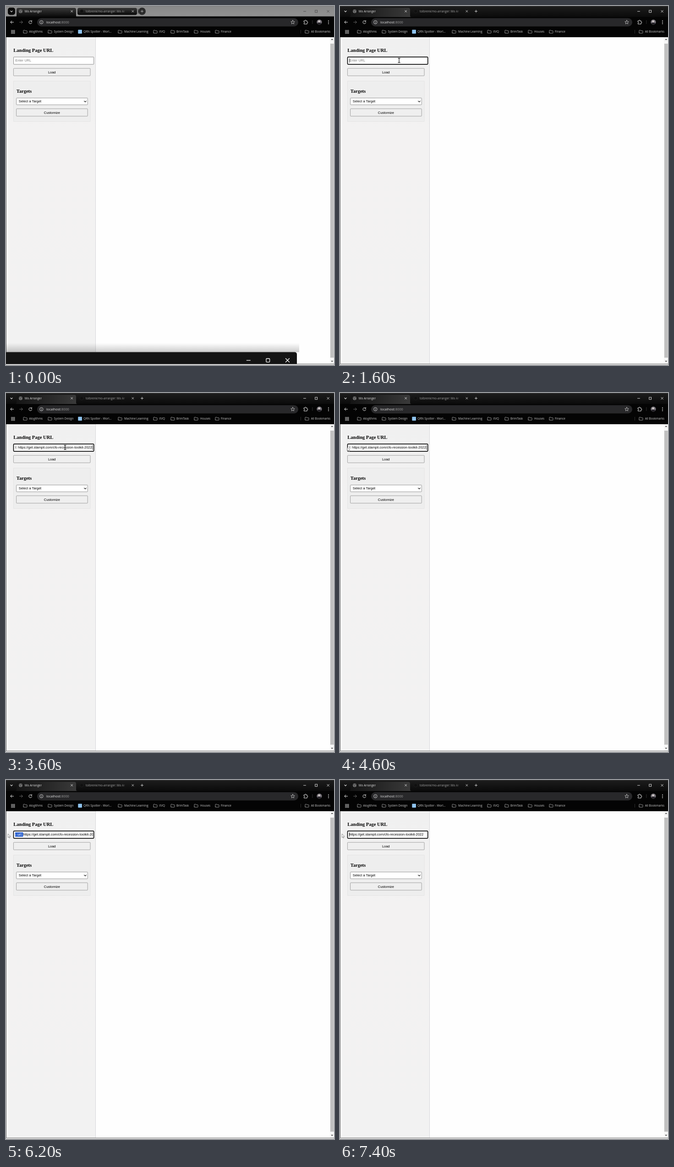
These frames come from a looping animation (716x782 px, 8 s). An HTML page:

```html
<!DOCTYPE html>
<html lang="en">
<head>
<meta charset="utf-8">
<title>Landing page form</title>
<style>
html, body { margin: 0; width: 100%; height: 100%; overflow: hidden; background: #fff; }
svg { display: block; width: 716px; height: 782px; }
text { white-space: pre; }
.ui { font: 6.35px "Open Sans", "Noto Sans", sans-serif; fill: #c9c9c9; }
.form { font: 7.45px "Liberation Sans", Arial, sans-serif; fill: #000; }
.head { font: bold 10.5px "Liberation Serif", "Times New Roman", serif; fill: #000; }
.line { fill: none; stroke-linecap: round; stroke-linejoin: round; }
</style>
</head>
<body>
<svg id="stage" viewBox="0 0 716 782" xmlns="http://www.w3.org/2000/svg">
<defs>
  <linearGradient id="barOn" x2="0" y2="1"><stop stop-color="#1d1d1d"/><stop offset="1" stop-color="#0b0b0b"/></linearGradient>
  <linearGradient id="barOff" x2="0" y2="1"><stop stop-color="#888"/><stop offset="1" stop-color="#929292"/></linearGradient>
  <linearGradient id="tabOn"><stop stop-color="#141414"/><stop offset="1" stop-color="#3a3a3a"/></linearGradient>
  <linearGradient id="tabOff" x2="0" y2="1"><stop stop-color="#383838"/><stop offset="1" stop-color="#080808"/></linearGradient>
  <linearGradient id="fade" gradientUnits="userSpaceOnUse" x1="250" x2="269"><stop stop-color="#a0a0a0"/><stop offset="1" stop-color="#a0a0a0" stop-opacity="0"/></linearGradient>
  <linearGradient id="side" x2="0" y2="1"><stop stop-color="#f0f0f0"/><stop offset=".3" stop-color="#f3f2f2"/><stop offset="1" stop-color="#f2f2f2"/></linearGradient>
  <linearGradient id="shade" x2="0" y2="1"><stop stop-color="#000" stop-opacity="0"/><stop offset="1" stop-color="#000" stop-opacity=".2"/></linearGradient>
  <clipPath id="field"><rect x="20" y="112" width="170" height="15"/></clipPath>
  <clipPath id="face"><circle cx="684" cy="35" r="5.6"/></clipPath>
</defs>
<g id="page"></g>
<g id="input"></g>
<g id="chrome"></g>
<g id="strip"></g>
<g id="overlap"></g>
<g id="pointer"></g>
</svg>
<script>
const $ = id => document.getElementById(id);
const LOOP = 8000, STEP = 200;
const PREFIX = "- url: ";
const URL_TEXT = "https://get.stampli.com/cfo-recession-toolkit-2022";
const APP = "Mo Arranger";

const rect = (x, y, w, h, fill, more = "") =>
  `<rect x="${x}" y="${y}" width="${w}" height="${h}" fill="${fill}" ${more}/>`;
const label = (x, y, str, cls, more = "") =>
  `<text x="${x}" y="${y}" class="${cls}" ${more}>${str}</text>`;
const path = (d, color, w = 1, more = "") =>
  `<path class="line" d="${d}" stroke="${color}" stroke-width="${w}" ${more}/>`;
const circle = (x, y, r, fill, more = "") =>
  `<circle cx="${x}" cy="${y}" r="${r}" fill="${fill}" ${more}/>`;
const cross = (x, y, r, color, w) =>
  path(`M${x - r} ${y - r}l${2 * r} ${2 * r}m0 ${-2 * r}l${-2 * r} ${2 * r}`, color, w);
const folder = x =>
  path(`M${x - 4} 58.3v-4.6q0-.9.9-.9h2l1.2 1.1h3q.9 0 .9.9v3.5q0 .9-.9.9h-6.2q-.9 0-.9-.9z`, "#b5b5b5", .8);
const button = (x, y, w, str) =>
  rect(x, y, w, 16.2, "#efefef", 'stroke="#8c8c8c" stroke-width=".8" rx="1"') +
  label(x + w / 2, y + 10.8, str, "form", 'text-anchor="middle"');

function drawPage() {
  return rect(0, 0, 716, 782, "#fefefe") +
    rect(1, 68, 4.5, 711, "#f9f9f9") +
    rect(5, 68, 190.5, 711, "url(#side)") +
    rect(195, 68, .9, 711, "#d3d3d6") +
    label(16.3, 100, "Landing Page URL", "head") +
    button(16.4, 135.8, 167.6, "Load") +
    rect(16.4, 163.6, 167.6, 87.8, "#eeeeee", 'stroke="#e2e2e2" stroke-width=".8"') +
    label(22.7, 189, "Targets", "head") +
    rect(22.6, 200.4, 155.6, 14.8, "#fff", 'stroke="#808080" stroke-width=".8" rx="1"') +
    label(27.7, 210.4, "Select a Target", "form") +
    path("M170.7 206.9l2.2 2.2 2.2-2.2", "#111", 1.1) +
    button(22.6, 223.8, 155.6, "Customize") +
    rect(707, 68, 9, 711, "#f6f6f6") +
    rect(708, 82, 7.6, 684, "#c0c0c0") +
    `<path d="M709.4 74l2.4-3 2.4 3zM709.4 772.8l2.4 3 2.4-3z" fill="#555"/>` +
    rect(0, 68, 1, 712, "#666") +
    rect(0, 779, 716, 1.4, "#858585") +
    rect(0, 780.4, 716, 1.6, "#dedede");
}

function drawChrome() {
  const marks = [["Alogithms", 42, 50.5], ["System Design", 96, 104.5], ["Machine Learning", 249, 258],
    ["XVQ", 326, 334.5], ["BrimTask", 364, 372], ["Houses", 415, 424], ["Finance", 461, 469], ["All Bookmarks", 657, 665.7]];
  let s = rect(0, 24, 716, 44, "#040404") +
    rect(68, 26.5, 570, 18, "#28282a", 'rx="9"') +
    path("M16.5 35.3h-6.6m3-3l-3 3 3 3", "#e4e4e4") +
    path("M29.7 35.3h6.6m-3-3l3 3-3 3", "#656565") +
    path("M56 33.4a3.3 3.3 0 1 0 .5 2.7M56.3 31.7v2h-2", "#e4e4e4") +
    circle(77.3, 35.3, 3.7, "none", 'stroke="#d8d8d8" stroke-width=".9"') +
    path("M77.3 35.1v2M77.3 33.4v.1", "#d8d8d8", .9) +
    `<text x="88" y="38" class="ui" style="font-size:7.4px;fill:#e8e8e8">localhost<tspan fill="#9b9b9b">:8000</tspan></text>` +
    path("M626 31l1.2 2.8 3 .3-2.3 2 .7 3-2.6-1.6-2.6 1.6.7-3-2.3-2 3-.3z", "#cfcfcf", .8) +
    path("M650.5 32.4h2.2q-.3-1.7 1.1-1.7t1.1 1.7h2.3v2.3q1.7-.2 1.7 1.1t-1.7 1.1v2.4h-6.7v-2.2q1.6 0 1.6-1.2t-1.6-1.2z", "#e0e0e0") +
    rect(668.5, 31, .8, 8, "#3c3c3c") +
    circle(684, 35, 5.6, "#77737a") +
    `<g clip-path="url(#face)">${circle(683.6, 33.6, 2.3, "#d0c9c8")}${rect(679.5, 36.3, 8.5, 6, "#242228", 'rx="3"')}</g>`;
  for (const y of [31.9, 35.2, 38.5]) s += circle(704, y, .95, "#e0e0e0");
  for (const x of [11.8, 16.2]) for (const y of [52.9, 57.2])
    s += rect(x, y, 2.7, 2.7, "none", 'stroke="#d0d0d0" stroke-width=".8"');
  for (const [name, ix, tx] of marks) s += folder(ix) + label(tx, 58.3, name, "ui");
  return s + rect(157.3, 51.7, 8.6, 8.6, "#8fc3ee", 'rx="1"') +
    label(169, 58.3, "QRN Spotter - Worl...", "ui") + rect(643, 52, .8, 8, "#3c3c3c");
}

function drawStrip(active) {
  const tab = (x, fill) =>
    `<path d="M${x - 3} 24q3 0 3-3V8q0-4 4-4h122q4 0 4 4v13q0 3 3 3z" fill="${fill}"/>`;
  const ink = active ? "#eaeaea" : "#4b4b4b";
  let s = rect(0, 0, 716, 24, active ? "url(#barOn)" : "url(#barOff)");
  if (!active) s += rect(0, 22.5, 716, 1.5, "#111") +
    rect(4, 3.5, 16, 16, "#0b0b0b", 'rx="5"') + rect(156, 4, 130, 15.5, "url(#tabOff)", 'rx="4"') +
    rect(288, 6, 1, 11, "#333") + circle(297, 11.5, 8, "#2b2b2b");
  return s + tab(23, active ? "url(#tabOn)" : "url(#tabOff)") +
    path("M9.9 10.7l2.1 2.1 2.1-2.1", "#eee", 1.1) +
    circle(32, 11.5, 3.9, "#777") +
    path("M29.2 9.5l2 1.2-.5 1.6 1.8 1 .1 1.6M32.7 8.2l.2 1.8 2 .7", "#333", 1) +
    label(40.7, 13.9, APP, "ui", 'style="fill:#dedede"') +
    cross(143.6, 11.5, 1.9, "#eee", .9) +
    circle(165.3, 11.5, 3.8, "#101010", 'stroke="#252525" stroke-width=".7"') +
    label(174, 13.9, "tolbrenk/mo-arranger: Mo Ar", "ui", 'style="fill:url(#fade)"') +
    cross(276.8, 11.5, 1.9, "#ddd", .9) +
    path("M294.4 11.5h5.2M297 8.9v5.2", active ? "#ddd" : "#bbb", .9) +
    path("M649.5 11.7h5", ink, .9) +
    rect(674.8, 9.2, 4.8, 4.8, "none", `stroke="${ink}" stroke-width=".9"`) +
    cross(703.2, 11.6, 2.3, ink, .9) +
    rect(0, 0, 716, .7, active ? "#444" : "#777");
}

function drawOverlap() {
  return rect(0, 734, 640, 20, "url(#shade)") +
    `<path d="M0 754h630q5 0 5 5v21H0z" fill="#141414"/>` +
    rect(0, 753.6, 631, .8, "#555") +
    path("M525.3 771.8h8", "#fff", 1.3) +
    rect(568, 768, 7.6, 7.6, "none", 'stroke="#fff" stroke-width="1.3" rx="1"') +
    cross(614.5, 771.8, 4, "#fff", 1.3);
}

function drawInput(t) {
  const focus = t >= 1600;
  let s = rect(16.5, 111.1, 175.2, 16, "#fff", focus
    ? 'stroke="#111" stroke-width="1.7" rx="1.6"' : 'stroke="#808080" stroke-width=".9" rx="1"');
  const caret = x => rect(x, 114, .8, 9.6, "#000");
  const base = 121.4;
  let body = "";
  if (t < 3600) {
    body = label(20.3, base, "Enter URL", "form", 'style="fill:#7c7c7c"');
    if (focus) body += caret(20.6);
  } else if (t < 7000) {
    // dragging left scrolls the field back to its start
    const shift = 11.4 * Math.min(1, Math.max(0, (t - 5600) / 400));
    const start = 26 + shift;
    if (t >= 5600) body += rect(20, 114, start - 20, 9.6, "#2f64d0");
    body += label(start - 17, base, PREFIX, "form", t >= 5600 ? 'style="fill:#fff"' : "") +
      label(start, base, URL_TEXT, "form");
    if (t < 5200) body += caret(188.4);
    else if (t < 5600) body += caret(25.4);
  } else {
    body = label(20.5, base, URL_TEXT, "form") + caret(20.1);
  }
  return s + `<g clip-path="url(#field)">${body}</g>`;
}

const ROUTE = [[200, 300, 205], [600, 190, 165], [1000, 132, 130], [1200, 126, 125.2], [1400, 126, 125.2],
  [1600, 129, 118.5], [3800, 129, 118.5], [4600, 16, 118.5], [5000, 24, 118.5], [5400, 22.3, 118],
  [6000, 4.2, 117.3], [8000, 4.2, 117.3]];

function pointerAt(t) {
  const i = Math.max(1, ROUTE.findIndex(p => p[0] >= t));
  const [t0, x0, y0] = ROUTE[i - 1], [t1, x1, y1] = ROUTE[i];
  const k = (t - t0) / (t1 - t0);
  return [x0 + (x1 - x0) * k, y0 + (y1 - y0) * k];
}

function drawPointer(t) {
  if (t < 200) return "";
  const [x, y] = pointerAt(t);
  const inField = x > 16 && x < 192 && y > 110 && y < 128;
  const shape = inField
    ? path("M-2.3-4.6h1.5q.8 0 .8.8v7.6q0 .8-.8.8h-1.5M2.3-4.6H.8q-.8 0-.8.8v7.6q0 .8.8.8h1.5", "#111", 1.1)
    : `<path d="M0 0v8.1l2-1.8 1.3 2.9 1.2-.6-1.3-2.8 2.7-.1z" fill="#fff" stroke="#777" stroke-width=".8"/>`;
  return `<g transform="translate(${x} ${y})">${shape}</g>`;
}

$("page").innerHTML = drawPage();
$("chrome").innerHTML = drawChrome();
$("overlap").innerHTML = drawOverlap();

let last = -1, wasActive = null;
function render(ms) {
  const t = Math.floor((ms % LOOP) / STEP) * STEP;
  if (t !== last) {
    const active = t >= 1600;
    if (active !== wasActive) {
      $("strip").innerHTML = drawStrip(active);
      $("overlap").style.display = active ? "none" : "";
      wasActive = active;
    }
    $("input").innerHTML = drawInput(t);
    $("pointer").innerHTML = drawPointer(t);
    last = t;
  }
}
const begin = performance.now();
function tick() {
  render(performance.now() - begin);
  requestAnimationFrame(tick);
}
tick();
</script>
</body>
</html>
```
